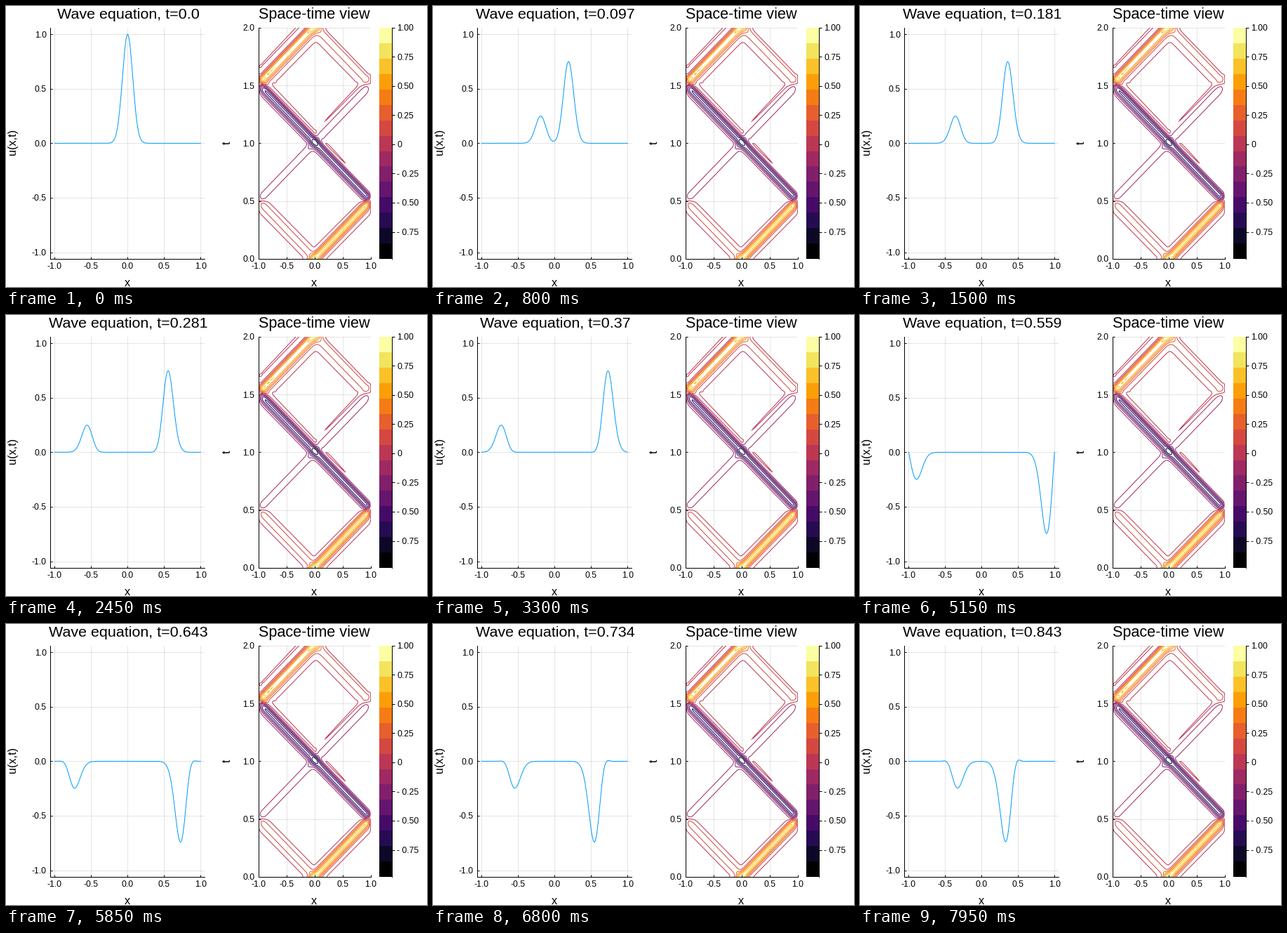
Recreate the animation shown at these times as a matplotlib script. Size 600 px wide and 400 px high, loop 8 s.

```python
import numpy as np
import matplotlib.pyplot as plt
from matplotlib.animation import FuncAnimation

W, H, DPI = 600, 400, 100
FRAMES, STEP_MS = 160, 50
PT = 72 / DPI  # points per pixel

plt.rcParams["font.family"] = "Liberation Sans"
plt.rcParams["axes.unicode_minus"] = False


def diff_matrix(m, h):
    """Second-order first derivative with one-sided end rows."""
    d = (np.eye(m + 1, k=1) - np.eye(m + 1, k=-1)) / (2 * h)
    d[0, :3] = np.array([-1.5, 2, -0.5]) / h
    d[-1, -3:] = np.array([0.5, -2, 1.5]) / h
    return d


def solve_wave(x, times, c=2.0):
    """u_t = z_x, z_t = c^2 u_x with u = 0 at both walls, by RK4."""
    d = diff_matrix(len(x) - 1, x[1] - x[0])

    def rate(w):
        u, z = w
        du = d @ z
        du[0] = du[-1] = 0
        return np.array([du, c**2 * (d @ u)])

    u0 = np.exp(-100 * x**2)
    w = np.array([u0, -u0])
    w[0, 0] = w[0, -1] = 0
    rows = [w[0]]
    for dt in np.diff(times):
        k1 = rate(w)
        k2 = rate(w + dt / 2 * k1)
        k3 = rate(w + dt / 2 * k2)
        k4 = rate(w + dt * k3)
        w = w + dt / 6 * (k1 + 2 * k2 + 2 * k3 + k4)
        rows.append(w[0])
    return np.array(rows)


# The solver's steps vary a little in length.
shown = np.interp(np.arange(FRAMES),
                  [0, 30, 66, 88, 117, 136, 159],
                  [0, 0.181, 0.37, 0.47, 0.643, 0.734, 0.843])
times = np.concatenate([shown, np.linspace(shown[-1], 2, 232)[1:]])
x = np.linspace(-1, 1, 201)
u = solve_wave(x, times)
levels = np.linspace(u.min(), u.max(), 15)
colors = plt.get_cmap("inferno")(np.linspace(0, 1, 15))

fig = plt.figure(figsize=(W / DPI, H / DPI), dpi=DPI, facecolor="white")


def panel(left, right, top=30.9, bottom=359.9):
    ax = fig.add_axes([left / W, 1 - bottom / H,
                       (right - left) / W, (bottom - top) / H])
    for spine in ax.spines.values():
        spine.set_linewidth(PT)
    ax.spines[["top", "right"]].set_visible(False)
    ax.set_axisbelow(True)
    return ax


def label(px, py, text, size, **kw):
    kw = {"ha": "center", "va": "baseline", **kw}
    return fig.text(px / W, 1 - py / H, text, fontsize=size * PT, **kw)


def style(ax, xlim, ylim, yticks):
    ax.set(xlim=xlim, ylim=ylim)
    xticks = np.arange(-1, 1.1, 0.5)
    ax.set_xticks(xticks, [f"{v:.1f}" for v in xticks])
    ax.set_yticks(yticks, [f"{v:.1f}" for v in yticks])
    ax.grid(color="black", alpha=0.1, linewidth=PT)
    ax.tick_params(direction="in", length=3 * PT, width=PT,
                   labelsize=12.3 * PT)
    ax.tick_params(axis="x", pad=5.6 * PT)
    ax.tick_params(axis="y", pad=5.5 * PT)


wave = panel(63.2, 283.4)
style(wave, (-1.06, 1.06), (-1.06, 1.06), np.arange(-1, 1.1, 0.5))
curve, = wave.plot(x, u[0], color="#009afa", linewidth=PT)
title = label(174.3, 17.8, "", 21.5)
label(173, 398.6, "x", 16.3)
label(9, 193.8, "u(x,t)", 16.3, rotation=90, va="center")

view = panel(359.9, 519.9)
style(view, (-1, 1), (0, 2), np.arange(0, 2.1, 0.5))
view.contour(x, times, u, levels=levels, colors=colors, linewidths=PT,
             linestyles="solid")
label(439.3, 17.8, "Space-time view", 21.6)
label(439.2, 398.6, "x", 16.3)
label(314.8, 195, "t", 16.3, rotation=90, va="center")

bar = panel(532.4, 550.4, 30.6, 359.6)
bar.imshow(colors[:, None, :], origin="lower", aspect="auto",
           interpolation="nearest", extent=(0, 1, levels[0], levels[-1]))
bar.spines[["left", "bottom"]].set_visible(False)
bar.spines["right"].set_visible(True)
bar.set_xticks([])
ticks = np.arange(-0.75, 1.1, 0.25)
bar.set_yticks(ticks, ["0" if v == 0 else f"{v:.2f}".replace("-", "- ")
                       for v in ticks])
bar.yaxis.tick_right()
bar.tick_params(axis="y", length=4 * PT, width=PT, pad=3 * PT,
                labelsize=12.3 * PT)


def draw(i):
    curve.set_ydata(u[i])
    title.set_text(f"Wave equation, t={round(float(shown[i]), 3)}")
    return curve, title


anim = FuncAnimation(fig, draw, frames=FRAMES, init_func=lambda: draw(0),
                     interval=STEP_MS, repeat=True, repeat_delay=0)
plt.show()
```
